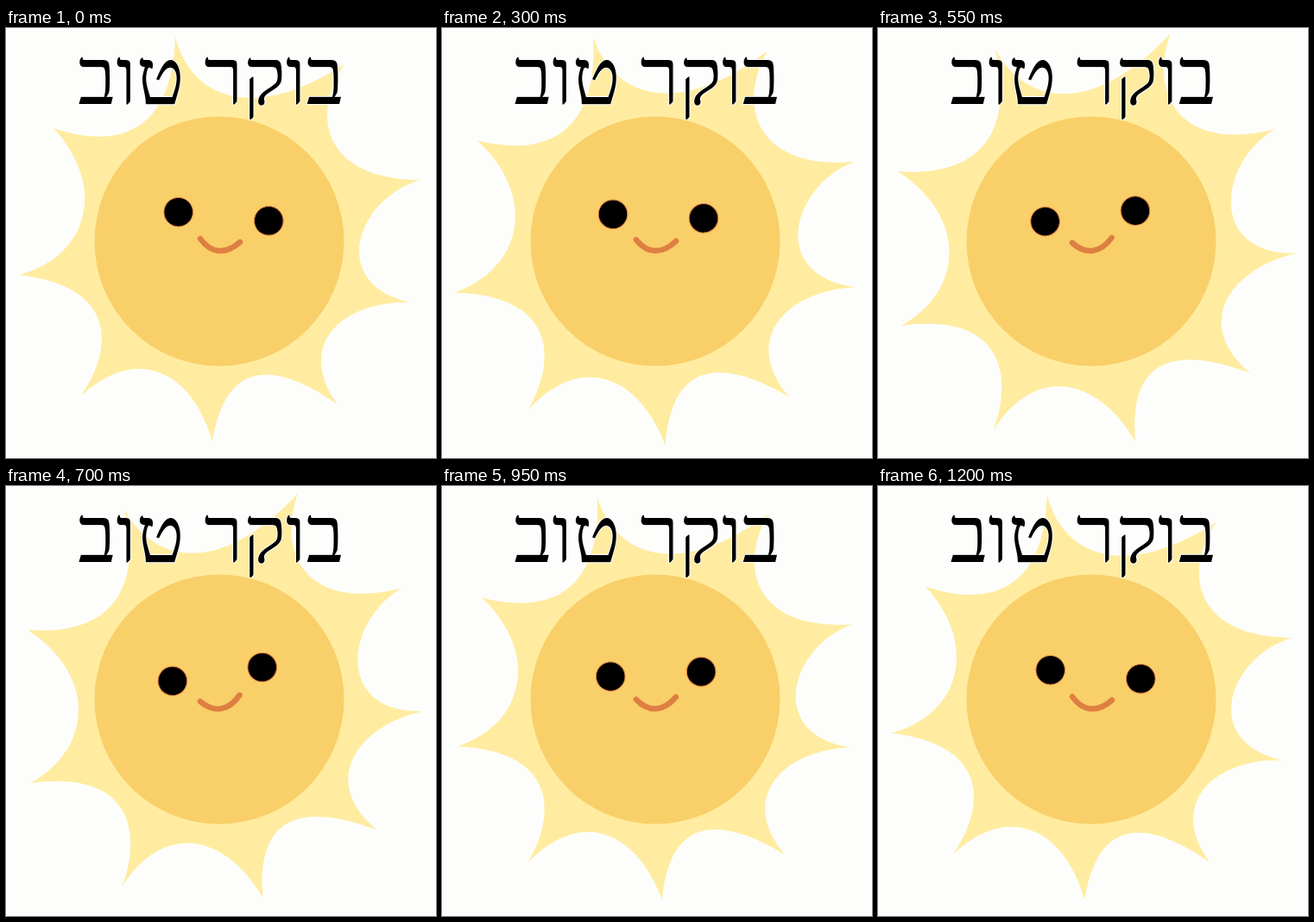
Recreate the animation shown at these times as an HTML page. Size 498x498 px, loop 1.25 s.

```html
<!DOCTYPE html>
<html lang="he">
<head>
<meta charset="utf-8">
<title>בוקר טוב</title>
<style>
  html, body { margin: 0; width: 100%; height: 100%; overflow: hidden; background: #fdfefc; }
  svg { display: block; width: 100vw; height: 100vh; }
  text {
    font: 92px "Liberation Serif", "Times New Roman", serif;
    direction: rtl;
    text-anchor: middle;
    stroke: #fff;
    stroke-width: 2;
    paint-order: stroke;
  }
</style>
</head>
<body>
<svg viewBox="0 0 498 498">
  <path id="rays" fill="#ffeca0" d="M392 42
    C350 105 372 176 480 176
    C408 196 370 296 469 318
    C393 315 333 365 384 436
    C315 388 255 380 239 479
    C215 395 150 367 87 426
    C128 366 124 298 15 286
    C95 265 118 185 55 116
    C125 140 193 125 196 10
    C215 85 290 108 392 42Z"/>
  <circle cx="247" cy="247" r="144.5" fill="#f9cf69"/>
  <g id="face" stroke="#de7f42">
    <circle cx="199.7" cy="213.2" r="16.8"/>
    <circle cx="304.3" cy="223.3" r="16.8"/>
    <path d="M225 244C237 261 254 263 271 248" fill="none" stroke-width="6.5" stroke-linecap="round"/>
  </g>
  <text x="237.5" y="88">בוקר טוב</text>
</svg>
<script>
  const LOOP = 1250, STEP = 50;
  const rays = document.getElementById('rays');
  const face = document.getElementById('face');

  // [ms, value] keys
  const spin = [[0, 0], [200, -2.2], [300, -4.8], [450, -11.5], [600, -15], [700, -14.4], [950, -3.9], [1100, -0.6], [1250, 0]];
  const grow = [[0, 1], [200, 1.007], [300, 1.019], [450, 1.028], [700, 1.016], [950, 1.002], [1250, 1]];
  const tilt = [[0, 0], [200, -1.4], [300, -3], [450, -8.8], [600, -13.4], [700, -14.2], [950, -8.5], [1200, 0], [1250, 0]];

  const rate = (a, b) => (b[1] - a[1]) / (b[0] - a[0]);

  // Tangent at key i, flat at turning points and ends
  function tangent(keys, i) {
    if (i === 0 || i === keys.length - 1) return 0;
    const l = rate(keys[i - 1], keys[i]), r = rate(keys[i], keys[i + 1]);
    return l * r > 0 ? 2 * l * r / (l + r) : 0;
  }

  function ease(keys, t) {
    const i = keys.findIndex(k => k[0] > t) - 1;
    const [t0, a] = keys[i], [t1, b] = keys[i + 1];
    const d = t1 - t0, u = (t - t0) / d, v = 1 - u;
    return a * v * v * (1 + 2 * u) + b * u * u * (3 - 2 * u)
      + d * u * v * (tangent(keys, i) * v - tangent(keys, i + 1) * u);
  }

  const turn = (angle, scale) =>
    `translate(247 247) rotate(${angle}) scale(${scale}) translate(-247 -247)`;

  const start = performance.now();
  function draw() {
    const t = Math.floor((performance.now() - start) % LOOP / STEP) * STEP;
    rays.setAttribute('transform', turn(ease(spin, t), ease(grow, t)));
    face.setAttribute('transform', turn(ease(tilt, t), 1));
    requestAnimationFrame(draw);
  }
  draw();
</script>
</body>
</html>
```
